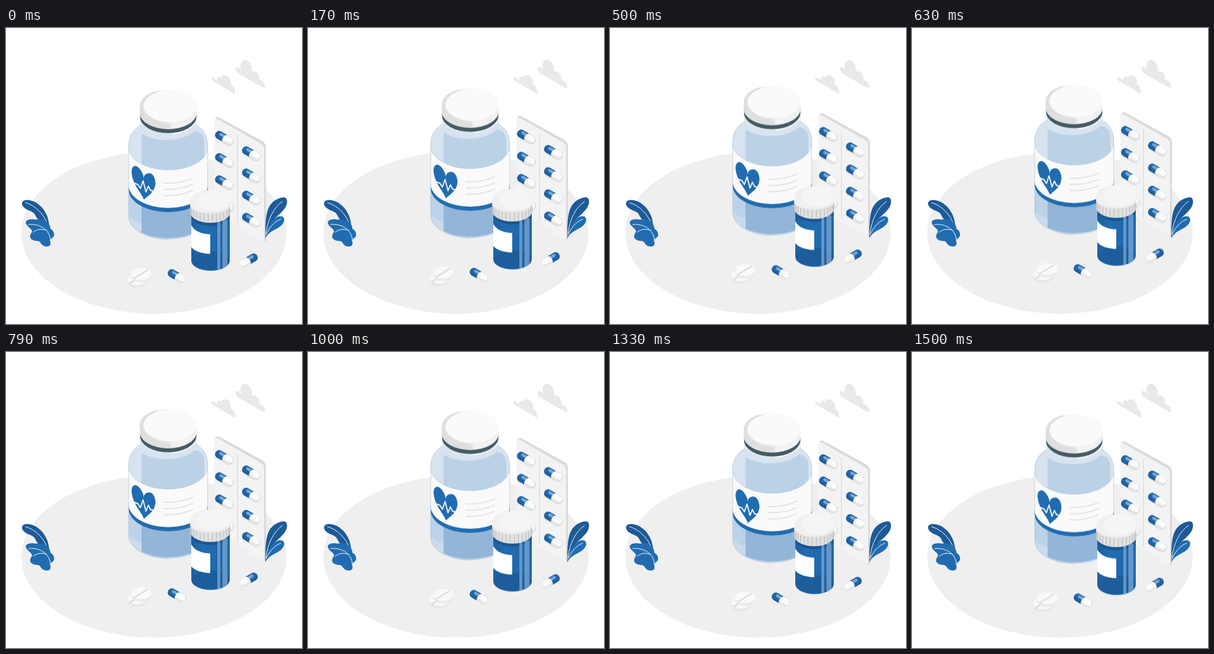
Recreate the animation shown at these times as an HTML page. Size 500 px wide and 500 px high, loop 1540 ms.

```html
<!DOCTYPE html>
<html lang="en">
<head>
<meta charset="utf-8">
<title>Floating medicine</title>
<style>
  html, body { margin: 0; width: 100%; height: 100%; overflow: hidden; background: #fff; }
  svg { display: block; width: 100%; height: 100%; }
  .float { animation: float 1540ms linear -65ms infinite; }
  @keyframes float {
    0%, 100% { transform: translateY(.9px); }
    50% { transform: translateY(-9.3px); }
  }
  .line { fill: none; stroke-linecap: round; stroke-linejoin: round; }
  .vein { stroke: #fff; stroke-width: 1; }
</style>
</head>
<body>
<svg viewBox="0 0 500 500" xmlns="http://www.w3.org/2000/svg">
  <defs>
    <linearGradient id="rim" x1="0" x2="1">
      <stop offset="0" stop-color="#dcdcdc"/>
      <stop offset=".5" stop-color="#e6e6e6"/>
      <stop offset=".58" stop-color="#f3f3f3"/>
      <stop offset="1" stop-color="#f0f0f0"/>
    </linearGradient>
    <linearGradient id="tube" x1="0" x2="1">
      <stop offset="0" stop-color="#1d5f9f"/>
      <stop offset=".3" stop-color="#216cb0"/>
      <stop offset="1" stop-color="#1f66a8"/>
    </linearGradient>
    <clipPath id="capsule"><rect x="-16.5" y="-7" width="33" height="14" rx="7"/></clipPath>
    <clipPath id="jar"><path d="M207 199C207 181 217 169 230 163H319C332 169 341 181 341 199V318A67 39 0 0 1 207 318Z"/></clipPath>
    <clipPath id="vial"><path d="M313 312H378V393A32.5 17 0 0 1 313 393Z"/></clipPath>
    <g id="pill" clip-path="url(#capsule)">
      <rect x="-17" y="-7" width="34" height="14" fill="#1f66a8"/>
      <path d="M-17 2Q-12 5 0 4.500V7H-17Z" fill="#1b5a98"/>
      <rect x="-10.500" y="-5" width="13" height="5" rx="2.500" fill="#7ba5d0"/>
      <path d="M1.500-7Q-5 0 .5 7H17V-7Z" fill="#fbfbfb"/>
      <path d="M.5 7Q-1.500 5 -1.700 3.500H11Q15 3 17 -1V7Z" fill="#e6e6e6"/>
    </g>
    <g id="blister">
      <rect x="-16.5" y="-8.3" width="34.5" height="17" rx="8.5" fill="#dedede"/>
      <rect x="-16.5" y="-8.6" width="33.5" height="15.8" rx="7.9" fill="#f7f7f7"/>
      <use href="#pill"/>
    </g>
  </defs>

  <ellipse cx="250" cy="346" rx="224" ry="136.500" fill="#efefef"/>

  <g fill="#e9e9e9">
    <path d="M346 84C350 82 354 86 357 89C355 82 360 80 363 84C366 78 375 78 379 87C381 91 380 93 380 96C385 96 388 105 387 111C384 110 381 108 378 106L351 90.500C348 89 347 87 346 84Z"/>
    <path d="M388 68C390 64 394 66 397 71C394 60 399 52 406 54C413 57 417 66 415 74C422 70 429 79 428 88C434 88 439 96 438 101C435 101 433 100 430 98.500L393 77C389 75 388 72 388 68Z"/>
  </g>

  <g>
    <path d="M27 297C27 289 39 289 49 294C64 302 73 319 73 336C67 329 60 325 54 323C49 318 50 313 43 310C36 307 28 304 27 297Z" fill="#1d5a98"/>
    <path class="line vein" d="M33 295C50 300 64 314 71 333"/>
    <path d="M34 331C31 325 40 322 48 323.500C54 324 58 321 65 325C71 328 75 333 75 339C82 343 83 351 79 354C73 357 76 361 75 366C72 371 63 370 59 364C56 357 51 362 45 358C38 354 41 349 44 344C44 339 37 337 34 331Z" fill="#216cb0"/>
    <path class="line vein" d="M38 332C53 330 75 338 75 360M46 345C53 339 61 339 69 342"/>
  </g>

  <g class="float">
    <path d="M353 160V156Q354 149 360 151L433 191Q439 195 439 201V359L437 361Z" fill="#dadada"/>
    <path d="M352 161Q351 151 358 154L430 195Q436 198 436 205V360L352 311Z" fill="#f3f3f3"/>
    <path class="line" d="M391 180V329" stroke="#d8d8d8" stroke-width="1.200"/>
    <g id="pack"></g>

    <g clip-path="url(#jar)">
      <rect x="207" y="160" width="134" height="200" fill="#d7e3ef"/>
      <path d="M229 260V184Q229 177 234 181C255 193 298 193 319 174Q335 176 335 194V260Z" fill="#bbd1e6"/>
      <path d="M207 260H341V360H207Z" fill="#bcd2e8"/>
      <path d="M207 317Q217 327 229 328V360H207Z" fill="#cbdbeb"/>
      <path d="M229 260H341V318A67 37 0 0 1 229 345Z" fill="#92b5d8"/>
      <path d="M207 201A67 39 0 0 0 341 201V272A67 39 0 0 1 207 272Z" fill="#216cb0"/>
      <path d="M207 201A67 39 0 0 0 341 201V265A67 39 0 0 1 207 265Z" fill="#fafafa"/>
    </g>
    <path class="line" d="M230 163C217 169 207 181 207.300 199V318A67 39 0 0 0 274 357M319 163C332 169 341 181 340.700 199V274" stroke="#a9c1da" stroke-width=".7"/>

    <path d="M227 149V162A48 28 0 0 0 322 162V149Z" fill="#d9e4ef"/>
    <path d="M227 150V154A48 28 0 0 0 322 154V150Z" fill="#e8e9ea"/>
    <path d="M279 177Q306 174 321 157V161Q307 176 281 180Z" fill="#f8f8f8"/>
    <path d="M226.500 145V150A47.500 27.500 0 0 0 321.500 150V145Z" fill="#455a64"/>
    <path d="M226 133C226 117 247 105 274 105C301 105 322 117 322 133V143A48 28 0 0 1 226 143Z" fill="url(#rim)"/>
    <path d="M226 133C226 117 242 108 258 106L232 132C234 150 252 160 278 163V170A48 27 0 0 1 226 144Z" fill="#dfdfdf"/>
    <ellipse cx="277" cy="132" rx="45" ry="27" fill="#fafafa"/>

    <path d="M232 249C228 238 221 231 216 233.500C210 237 212 248 215 257C220 271 229 279 233 290C239 284 252 277 252.500 262C252 250 246 244 240 245.500C235 246 233 250 232 254Z" fill="#216cb0"/>
    <path class="line" d="M214 261L223 264.500L227 271L231.500 258L236.500 277L240.500 267L244 274L253 277" stroke="#fafafa" stroke-width="1.900"/>
    <path class="line" d="M267 262Q295 263 315 253.500M267 272.500Q295 273.500 315 264M267 283Q295 284 315 274.500" stroke="#e0e0e0" stroke-width="1.800"/>

    <g clip-path="url(#vial)">
      <rect x="313" y="312" width="65" height="100" fill="url(#tube)"/>
      <path d="M313 312H378V318A32.500 16 0 0 1 313 318Z" fill="#1a5591"/>
      <ellipse cx="345.500" cy="393" rx="32" ry="15.500" fill="#1d5d9c"/>
      <path d="M357 326H362V412H357ZM365.500 323H374V412H365.500Z" fill="#75a3d0" opacity=".8"/>
      <path d="M313 333C318 343 330 348 345 348.500V381.500C331 381 318 377 313 370Z" fill="#fff"/>
    </g>
    <path d="M311 295H379V311A34 18 0 0 1 311 311Z" fill="#e2e2e2"/>
    <g id="ribs" class="line" stroke="#b9b9b9" stroke-width="1.200"></g>
    <path d="M311 294C311 282 326 274 345 274C364 274 379 282 379 294V299A34 15 0 0 1 311 299Z" fill="#e9e9e9"/>
    <path d="M311 294C311 282 326 274 345 274C364 274 379 282 379 294V297A34 15 0 0 1 311 297Z" fill="#f0f0f0"/>
    <ellipse cx="351.500" cy="291.500" rx="27.500" ry="17.500" fill="#f5f5f5"/>

    <g>
      <path d="M205 424V430C206 441 236 441 238 430V424Z" fill="#e6e6e6"/>
      <ellipse cx="221.500" cy="424.500" rx="16.500" ry="10" fill="#f8f8f8"/>
      <path class="line" d="M210 431L218 425" stroke="#cfcfcf" stroke-width="2"/>
      <path d="M211.500 415V420C213 433 244 433 245.500 420V415Z" fill="#e9e9e9"/>
      <ellipse cx="228.500" cy="415.500" rx="17" ry="10.200" fill="#f9f9f9"/>
      <path class="line" d="M217 422.500L239 409" stroke="#d5d5d5" stroke-width="2"/>
    </g>
    <use href="#pill" transform="translate(288.500 419) rotate(30)"/>
    <use href="#pill" transform="translate(410 392.500) rotate(-30) scale(-1 1)"/>
  </g>

  <g>
    <path d="M438 355C438 338 438 314 444 303C450 291 462 286 470 286C476 287 476 296 472 303C465 314 454 319 448 329C443 338 440 346 438 355Z" fill="#1d5a98"/>
    <path d="M438 355C438 337 452 318 463 318C471 318 472 326 466 332.500C457 342 446 341 438 355Z" fill="#216cb0"/>
    <path class="line vein" d="M467 293C452 303 442 324 439 347M464 323C453 327 444 338 439 350"/>
  </g>
</svg>
<script>
  const add = (id, tag, attrs) => {
    const el = document.createElementNS('http://www.w3.org/2000/svg', tag);
    for (const key in attrs) el.setAttribute(key, attrs[key]);
    document.getElementById(id).append(el);
  };

  for (const [x, y] of [[368.5, 185.5], [414, 211.5]]) {
    for (let row = 0; row < 4; row++) {
      add('pack', 'use', { href: '#blister', transform: `translate(${x} ${y + row * 37.5}) rotate(30)` });
    }
  }

  // Ribs bunch up towards the sides of the round cap.
  for (let i = 1; i < 15; i++) {
    const a = Math.PI * i / 15;
    const x = 345 - 34 * Math.cos(a);
    const s = Math.sin(a);
    add('ribs', 'path', { d: `M${x} ${300 + 14 * s}V${310 + 17 * s}` });
  }
</script>
</body>
</html>
```
